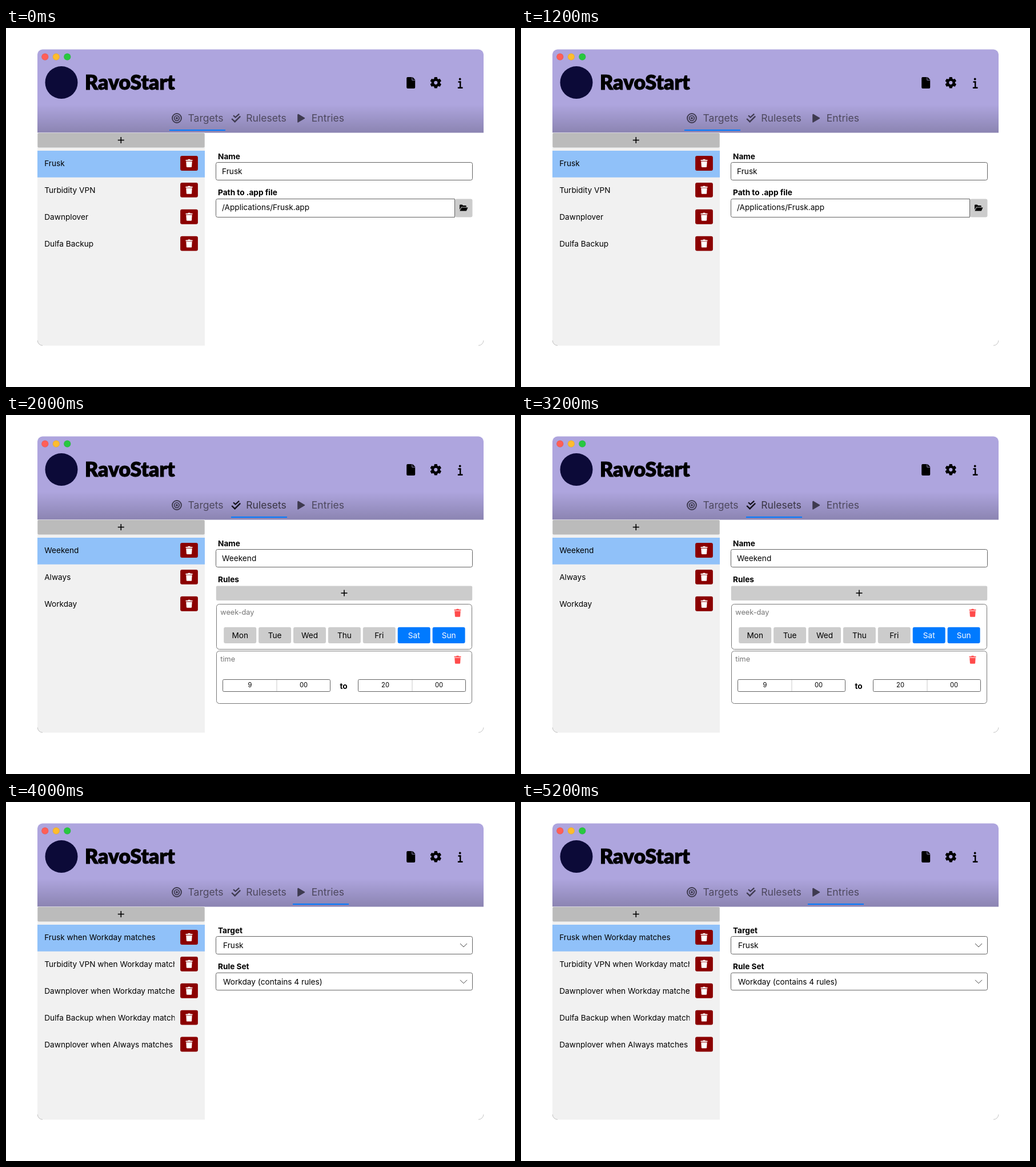
An HTML page with a canvas that plays this animation: 891x629 px, repeating every 6 s.

```html
<!DOCTYPE html>
<html lang="en">
<head>
<meta charset="utf-8">
<title>Launcher settings</title>
<style>
  html, body { margin: 0; width: 100%; height: 100%; overflow: hidden; background: #fff; }
  canvas { display: block; }
</style>
</head>
<body>
<canvas id="stage" width="891" height="629"></canvas>
<script>
const ctx = document.getElementById('stage').getContext('2d');
const SANS = 'Inter, sans-serif';
const BODY = 13.67, ROW = 46.87;
const BLUE = '#007aff', GREY = '#cccccc';
const APPS = ['Frusk', 'Turbidity VPN', 'Dawnplover', 'Dulfa Backup'];
const TABS = [
  { label: 'Targets', x: 318.5, line: 286 },
  { label: 'Rulesets', x: 420.3, line: 394 },
  { label: 'Entries', x: 534.7, line: 502 }
];
const LISTS = [
  APPS,
  ['Weekend', 'Always', 'Workday'],
  [...APPS.map(app => `${app} when Workday matches`), `${APPS[2]} when Always matches`]
];
const FORMS = [drawTargetForm, drawRulesForm, drawEntryForm];

function text(str, x, y, { size = BODY, weight = 400, color = '#000', align = 'left', family = SANS } = {}) {
  ctx.font = `${weight} ${size}px ${family}`;
  ctx.fillStyle = color;
  ctx.textAlign = align;
  ctx.fillText(str, x, y);
}

function rect(x, y, w, h, color, r = 0) {
  ctx.fillStyle = color;
  ctx.beginPath();
  ctx.roundRect(x, y, w, h, r);
  ctx.fill();
}

function outline(x, y, w, h, r = 3, color = '#626262') {
  ctx.strokeStyle = color;
  ctx.lineWidth = 1;
  ctx.beginPath();
  ctx.roundRect(x, y, w, h, r);
  ctx.stroke();
}

function disc(x, y, r, color) {
  ctx.fillStyle = color;
  ctx.beginPath();
  ctx.arc(x, y, r, 0, Math.PI * 2);
  ctx.fill();
}

function ring(x, y, r, width, color) {
  ctx.strokeStyle = color;
  ctx.lineWidth = width;
  ctx.beginPath();
  ctx.arc(x, y, r, 0, Math.PI * 2);
  ctx.stroke();
}

function tracePath(points) {
  ctx.beginPath();
  points.forEach(([x, y]) => ctx.lineTo(x, y));
}

function polyline(points, width, color) {
  tracePath(points);
  ctx.strokeStyle = color;
  ctx.lineWidth = width;
  ctx.stroke();
}

function polygon(points, color) {
  tracePath(points);
  ctx.closePath();
  ctx.fillStyle = color;
  ctx.fill();
}

function plus(x, y) {
  rect(x - 5.5, y - 0.8, 11, 1.6, '#000');
  rect(x - 0.8, y - 5.5, 1.6, 11, '#000');
}

function trash(x, y, color) {
  rect(x - 6, y - 6, 12, 1.8, color, 0.5);
  rect(x - 2.2, y - 7, 4.4, 2, color, 0.8);
  ctx.fillStyle = color;
  ctx.beginPath();
  ctx.moveTo(x - 5.2, y - 3.3);
  ctx.lineTo(x + 5.2, y - 3.3);
  ctx.lineTo(x + 4.6, y + 5.8);
  ctx.quadraticCurveTo(x + 4.5, y + 7, x + 3.3, y + 7);
  ctx.lineTo(x - 3.3, y + 7);
  ctx.quadraticCurveTo(x - 4.5, y + 7, x - 4.6, y + 5.8);
  ctx.fill();
}

function fileIcon(x, y, paper) {
  rect(x, y, 15, 20, '#000', 2);
  polygon([[x + 9.5, y - 1], [x + 16, y - 1], [x + 16, y + 5.5]], paper);
  polygon([[x + 10, y], [x + 15, y + 5], [x + 10, y + 5]], '#000');
  polyline([[x + 9.6, y], [x + 9.6, y + 5.4], [x + 15, y + 5.4]], 0.8, paper);
}

function gearIcon(x, y, paper) {
  disc(x, y, 7.6, '#000');
  for (let i = 0; i < 6; i++) {
    ctx.save();
    ctx.translate(x, y);
    ctx.rotate(i * Math.PI / 3);
    rect(-2.7, -9.8, 5.4, 5, '#000', 1);
    ctx.restore();
  }
  disc(x, y, 3.1, paper);
}

function infoIcon(x, y) {
  disc(x - 0.3, y - 7, 1.9, '#000');
  rect(x - 3.6, y - 3.2, 5, 2.4, '#000', 0.6);
  rect(x - 1, y - 3.2, 2.4, 12.4, '#000', 0.6);
  rect(x - 4.2, y + 7, 8.8, 2.4, '#000', 0.6);
}

function folderIcon(x, y) {
  polygon([[x, y + 9], [x, y + 0.8], [x + 0.8, y], [x + 4.5, y], [x + 6, y + 1.6],
    [x + 11, y + 1.6], [x + 11.8, y + 2.4], [x + 11.8, y + 4], [x + 3, y + 4]], '#000');
  polygon([[x + 3.5, y + 5], [x + 14.6, y + 5], [x + 11.8, y + 11], [x + 0.3, y + 11]], '#000');
}

function tabIcons(page) {
  const dim = '#3f3b50';
  ring(299, 158, 7.9, 2, dim);
  ring(299, 158, 4.3, 1.8, dim);
  disc(299, 158, 2, dim);
  const check = page === 1 ? '#14121c' : dim;
  polyline([[398, 153.2], [401.6, 156.6], [408.2, 150.6]], 2.2, check);
  polyline([[395.2, 159], [400.6, 164.2], [410.2, 154.6]], 2.4, check);
  ctx.lineJoin = 'round';
  const play = [[511, 151.2], [522.4, 158], [511, 164.8]];
  polygon(play, dim);
  polyline([...play, play[0]], 1.6, dim);
  ctx.lineJoin = 'miter';
}

function drawHeader(page) {
  const lilac = '#aea5de';
  rect(55, 37.5, 781, 146, lilac, [9, 9, 0, 0]);
  const shade = ctx.createLinearGradient(0, 134, 0, 183.5);
  shade.addColorStop(0, 'rgba(0,0,0,0)');
  shade.addColorStop(1, 'rgba(0,0,0,0.2)');
  rect(55, 134, 781, 49.5, shade);

  ['#ff5f57', '#febc2e', '#28c840'].forEach((color, i) => {
    const x = 68.3 + i * 19.5;
    disc(x, 50.6, 6, color);
    ring(x, 50.6, 5.8, 0.5, 'rgba(0,0,0,0.15)');
  });
  disc(97, 95.5, 28.5, '#0c0a38');

  const family = 'Lato, sans-serif';
  text('RavoStart', 138, 107.5, { size: 35.5, weight: 900, family });
  ctx.strokeStyle = '#000';
  ctx.lineWidth = 1;
  ctx.strokeText('RavoStart', 138, 107.5);

  fileIcon(701.2, 86, lilac);
  gearIcon(752.3, 95.8, lilac);
  infoIcon(795, 96.5);

  tabIcons(page);
  TABS.forEach((tab, i) => {
    const color = page === 1 && i === 1 ? '#3a3645' : '#4d485e';
    text(tab.label, tab.x, 164, { size: 17.57, color });
  });
  rect(TABS[page].line, 178, 98, 2, BLUE);
}

function drawList(items) {
  rect(55, 183.5, 293, 373, '#f1f1f1', [0, 0, 0, 9]);
  rect(55.3, 184, 292.4, 25.6, '#bbbbbb', 2);
  plus(201.3, 196.5);
  rect(55, 215, 293, ROW, '#90c1f9');
  ctx.save();
  ctx.beginPath();
  ctx.rect(55, 200, 240.3, 350);
  ctx.clip();
  items.forEach((item, i) => text(item, 67.2, 242.2 + i * ROW));
  ctx.restore();
  items.forEach((item, i) => {
    const y = 224.1 + i * ROW;
    rect(305.1, y, 30.8, 25.8, '#8b0000', 3);
    trash(320.5, y + 12.9, '#fff');
  });
}

function drawFrameCorners() {
  ctx.strokeStyle = '#aaa';
  ctx.lineWidth = 0.7;
  ctx.beginPath();
  ctx.arc(827, 547.5, 8.8, 0, Math.PI / 2);
  ctx.stroke();
  ctx.beginPath();
  ctx.arc(64, 547.5, 8.8, Math.PI / 2, Math.PI);
  ctx.stroke();
}

function label(str, y) {
  text(str, 371, y, { weight: 700 });
}

function drawTargetForm() {
  label('Name', 229.6);
  outline(367.5, 235.5, 449, 31);
  text(APPS[0], 378, 256);
  label('Path to .app file', 293);
  outline(367.5, 299.5, 418, 32, [3, 0, 0, 3]);
  text(`/Applications/${APPS[0]}.app`, 378, 319.4);
  rect(786, 299.5, 30.5, 32, GREY, 3);
  folderIcon(794, 309.5);
}

function timeField(x, hour, minute) {
  outline(x, 463.5, 188, 21, 2);
  rect(x + 94, 464, 1, 20, '#cccccc');
  text(hour, x + 47.5, 477.2, { size: 11.2, align: 'center' });
  text(minute, x + 141.5, 477.2, { size: 11.2, align: 'center' });
}

function ruleBox(title, y, h) {
  outline(368.5, y, 447, h, 5, '#777');
  text(title, 375.3, y + 18.3, { size: 12.69, color: '#757575' });
  trash(790.5, y + 15.3, '#ff4b4b');
}

function drawRulesForm() {
  label('Name', 229.6);
  outline(367.5, 235.5, 449, 31);
  text('Weekend', 378, 256);
  label('Rules', 293);
  rect(367.8, 299.5, 448.4, 25.4, GREY, 2);
  plus(592, 312);

  ruleBox('week-day', 331.5, 79);
  ['Mon', 'Tue', 'Wed', 'Thu', 'Fri', 'Sat', 'Sun'].forEach((day, i) => {
    const x = 381.2 + i * 60.9, picked = i > 4;
    rect(x, 371.7, 57, 28.3, picked ? BLUE : GREY, 3);
    text(day, x + 28.5, 390.8, { color: picked ? '#fff' : '#000', align: 'center' });
  });

  ruleBox('time', 413.5, 92);
  timeField(379.5, '9', '00');
  text('to', 591, 479.6, { weight: 700, align: 'center' });
  timeField(616.5, '20', '00');
}

function select(value, y, h) {
  outline(367.5, y, 449, h);
  text(value, 380, y + 20.2);
  polyline([[795, y + 12.5], [801, y + 18.5], [807, y + 12.5]], 1, '#444');
}

function drawEntryForm() {
  label('Target', 229.6);
  select(APPS[0], 235.5, 31);
  label('Rule Set', 293);
  select('Workday (contains 4 rules)', 299.3, 30.4);
}

function draw(page) {
  rect(0, 0, 891, 629, '#fff');
  drawHeader(page);
  drawList(LISTS[page]);
  drawFrameCorners();
  FORMS[page]();
}

const start = performance.now();
function tick() {
  const elapsed = Math.max(0, performance.now() - start);
  draw(Math.floor(elapsed % 6000 / 2000));
  requestAnimationFrame(tick);
}
tick();
</script>
</body>
</html>
```
